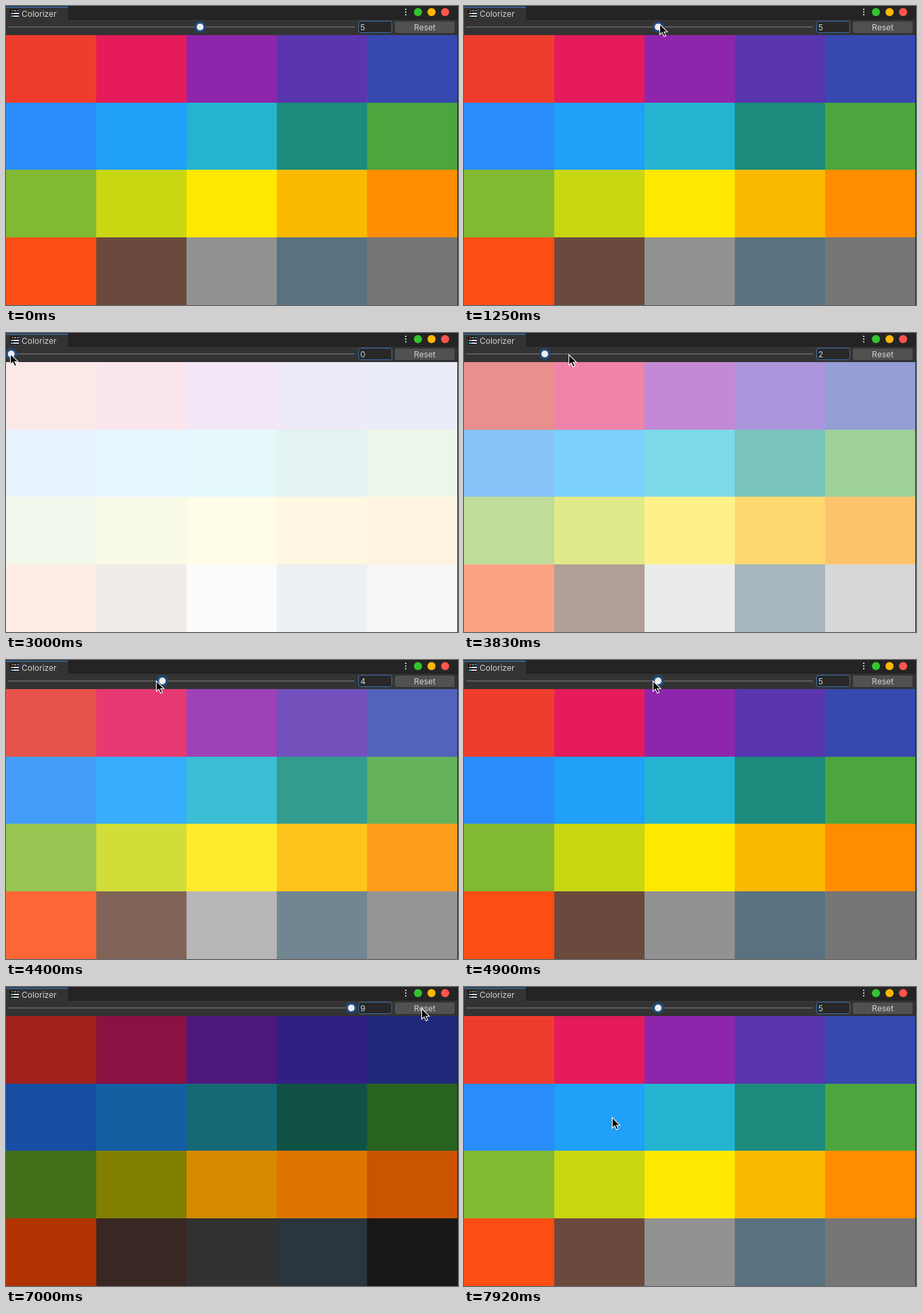
An HTML page with a canvas for the animation above (8000 ms loop, 666x442 px).

```html
<!DOCTYPE html>
<html lang="en">
<head>
<meta charset="utf-8">
<title>Colorizer</title>
<style>
  html, body { margin: 0; width: 100%; height: 100%; overflow: hidden; background: #282828; }
  canvas { display: block; }
</style>
</head>
<body>
<canvas id="stage" width="666" height="442"></canvas>
<script>
const ctx = document.getElementById('stage').getContext('2d');
const LOOP = 8000, FRAME = LOOP / 96;
const DRAG_START = 1250, RESET_AT = 7200;

// One row of swatches per shade level, left to right and top to bottom.
const SHADES = {
  2: `e98f8e f084a8 c389d6 ab95dc 949fd6 88c3fa 7bd0fc 7cdae8 79c3bd 9fd299
      bfdc99 e1ea8a fff18a ffd96f fdc46d fca383 b29f97 ebebeb a7b5be d7d7d7`,
  3: `de6867 eb5888 af5ec3 8a6dc9 6f7cc8 5eacf8 4dbbfb 4ecadc 4aada1 7dc077
      aad070 d9e560 ffed5b ffce35 fdac37 fd7f58 967d72 dcdcdc 8799a4 b3b3b3`,
  5: `ef3d2d e51b5b 8d26aa 5a35b0 3748b0 2a8df9 20a0f8 25b4d0 1c8a7c 4ba63e
      82b933 c9d612 ffe800 fbb900 ff8d00 fc4d12 6b4a3d 929292 5a727f 767676`,
  8: `b9251f 9f144b 5b1c90 3a249a 242f8c 1b59bb 176cba 187986 125f51 2e7225
      4e801e 949200 f69f00 ff8700 e96000 cb3a04 422e28 3a3a3a 303d46 1b1b1b`
};
for (const level in SHADES)
  SHADES[level] = SHADES[level].trim().split(/\s+/).map(hex => hex.match(/../g).map(c => parseInt(c, 16)));

// Cursor stops: time, x, y
const PATH = [
  [400, 240, 460], [1000, 288, 27], [1330, 288, 27], [2170, 172, 31],
  [2950, 6, 31], [3050, 6, 31], [3830, 154, 32], [4900, 276, 31],
  [6080, 438, 29], [6650, 512, 30], [7000, 612, 32], [7250, 612, 32], [7920, 216, 194]
];

const mix = (a, b, k) => a.map((c, i) => c + (b[i] - c) * k);

function swatch(i, level) {
  const at = l => SHADES[l][i];
  if (level < 2) return mix(at(2), [255, 255, 255], level ? 0.5 : 0.8);
  if (level > 8) return at(8).map(c => c * 0.87);
  if (level <= 3) return at(level);
  return level <= 5 ? mix(at(3), at(5), (level - 3) / 2) : mix(at(5), at(8), (level - 5) / 3);
}

function cursorAt(t) {
  if (t < PATH[0][0]) return null;
  const n = PATH.findIndex(p => p[0] > t);
  if (n < 0) return PATH[PATH.length - 1].slice(1);
  const a = PATH[n - 1], b = PATH[n];
  return mix(a.slice(1), b.slice(1), (t - a[0]) / (b[0] - a[0]));
}

// The slider reacts one frame after the cursor.
function levelAt(t) {
  if (t < DRAG_START || t >= RESET_AT) return 5;
  const x = cursorAt(t - FRAME)[0];
  return Math.max(0, Math.min(9, Math.round((x - 7.7) / 55.67)));
}

function rect(x, y, w, h, color) {
  ctx.fillStyle = color;
  ctx.fillRect(x, y, w, h);
}

function disc(x, y, r, color) {
  ctx.fillStyle = color;
  ctx.beginPath();
  ctx.arc(x, y, r, 0, 2 * Math.PI);
  ctx.fill();
}

function box(x, y, w, h, fill, stroke) {
  ctx.beginPath();
  ctx.roundRect(x + 0.5, y + 0.5, w - 1, h - 1, 3);
  ctx.fillStyle = fill;
  ctx.fill();
  ctx.strokeStyle = stroke;
  ctx.lineWidth = 1;
  ctx.stroke();
}

function label(text, x, y, align = 'left') {
  ctx.font = '12px Inter, sans-serif';
  ctx.textAlign = align;
  ctx.fillStyle = '#d2d2d2';
  ctx.fillText(text, x, y);
}

function drawHeader() {
  rect(0, 0, 666, 20, '#242424');
  rect(0, 1, 91, 19, '#333333');
  rect(0, 1, 91, 1.5, '#3a72b0');
  rect(0, 20, 666, 23, '#333333');
  rect(91, 19, 575, 1, '#1c1c1c');

  rect(6, 5, 13, 12, '#111111');
  ['#d04848', '#48b860', '#4a78d8'].forEach((c, i) => rect(8 + i * 4, 6, 3, 2, c));
  rect(7, 10, 5, 2, '#a8a8a8');
  rect(12, 10, 7, 2, '#f0f0f0');
  rect(7, 14, 4, 2, '#58b8c8');
  rect(11, 14, 8, 2, '#d8d8e8');
  label('Colorizer', 23, 16);

  for (const y of [4, 8, 12]) rect(588, y, 2, 2, '#c8c8c8');
  disc(607, 9, 6, '#33c52f');
  disc(627, 9, 6, '#ffb700');
  disc(647, 9, 6, '#ff544d');
}

function drawControls(level) {
  rect(3, 30, 511, 2, '#5b5b5b');
  const x = 7.7 + level * 55.67;
  disc(x, 31, 8.5, '#214a7b');
  disc(x, 31, 5, '#eeeeee');
  box(519, 22, 50, 18, '#282828', '#3a72b0');
  label(level, 522, 36);
  box(572, 22, 90, 19, '#515151', '#303030');
  label('Reset', 617, 36, 'center');
}

function drawGrid(level) {
  const rowTop = r => Math.round(42.9 + r * 99.75);
  for (let i = 0; i < 20; i++) {
    const row = Math.floor(i / 5), y = rowTop(row);
    rect(i % 5 * 133, y, 133, rowTop(row + 1) - y, `rgb(${swatch(i, level).map(Math.round)})`);
  }
  rect(665, 0, 1, 442, '#202020');
}

function drawCursor([x, y]) {
  ctx.save();
  ctx.translate(Math.round(x) + 0.5, Math.round(y));
  const arrow = new Path2D('M0 0V15.5L3.6 12.2L6.3 18L9 16.8L6.3 11.2H11.2Z');
  ctx.fillStyle = '#000';
  ctx.fill(arrow);
  ctx.strokeStyle = '#fff';
  ctx.lineWidth = 1.1;
  ctx.stroke(arrow);
  ctx.restore();
}

function draw(now) {
  const frame = Math.floor((now % LOOP + 18) / FRAME) % 96;
  const t = frame * FRAME, level = levelAt(t), cursor = cursorAt(t);
  drawHeader();
  drawControls(level);
  drawGrid(level);
  if (cursor) drawCursor(cursor);
}

let start;
function tick(now) {
  start ??= now;
  draw(now - start);
  requestAnimationFrame(tick);
}
requestAnimationFrame(tick);
</script>
</body>
</html>
```
